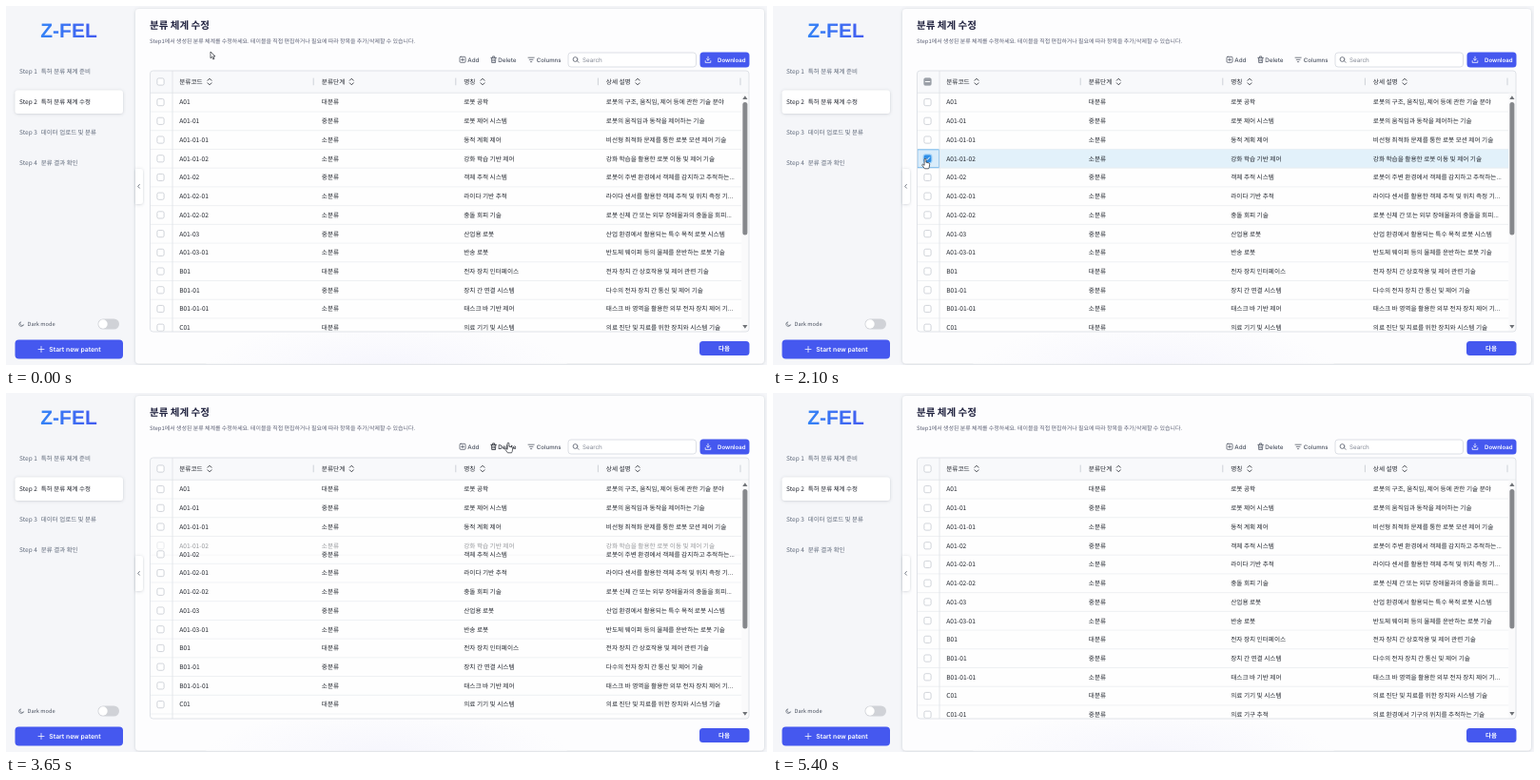
Write an HTML page that moves like this. It is 800 px wide and 377 px high and loops after 5450 ms.

```html
<!DOCTYPE html>
<html>
<head>
<meta charset="utf-8">
<title>분류 체계 수정</title>
<style>
  html, body { margin: 0; width: 100%; height: 100%; overflow: hidden; background: #f5f6f9; }
  svg { display: block; width: 800px; height: 377px; }
  text { font: 6.65px "Noto Sans CJK KR", "Noto Sans CJK", "Noto Sans", sans-serif; fill: #23272f; text-rendering: geometricPrecision; white-space: pre; }
  .ui { font: 500 6.25px Inter, sans-serif; fill: #4b5260; }
  .step { font-size: 6.5px; fill: #606a7b; }
  .head { font-weight: 500; }
  .line { fill: none; stroke: #4b5260; stroke-width: .75; stroke-linecap: round; stroke-linejoin: round; }
  .white { fill: #fff; }
  .line.white { fill: none; stroke: #fff; }
  .blue { fill: #4558ef; }
  .box { fill: #fff; stroke: #c6cad1; stroke-width: .8; }
  .hot text { fill: #171b24; }
  .hot .line { stroke: #171b24; }
</style>
</head>
<body>
<svg viewBox="0 0 800 377">
  <defs>
    <linearGradient id="brand"><stop stop-color="#3483f6"/><stop offset="1" stop-color="#435cf0"/></linearGradient>
    <filter id="soft" x="-20%" y="-20%" width="140%" height="140%"><feDropShadow dx="0" dy=".5" stdDeviation="1.5" flood-color="#606878" flood-opacity=".3"/></filter>
    <radialGradient id="tint"><stop stop-color="#f6f6fd"/><stop offset="1" stop-color="#fdfdfe"/></radialGradient>
    <clipPath id="body"><rect x="151" y="91.3" width="630" height="250.4"/></clipPath>
    <clipPath id="panel"><rect x="136" y="3" width="661" height="372.5" rx="4"/></clipPath>
    <clipPath id="frame"><rect x="151.5" y="68" width="629.5" height="274" rx="3"/></clipPath>
  </defs>

  <rect width="800" height="377" fill="#f5f6f9"/>
  <text x="66" y="33" text-anchor="middle" style="font:700 21px 'Liberation Sans',sans-serif;fill:url(#brand)">Z-FEL</text>
  <rect x="9.5" y="88.5" width="113.5" height="24.5" rx="3" fill="#fff" filter="url(#soft)"/>
  <g id="steps"></g>
  <path class="line" d="M18.3 335.1a2.4 2.4 0 1 1-2.7-3.3a2 2 0 0 0 2.7 3.3z" style="stroke-width:.6"/>
  <text x="22.5" y="336.1" style="font-size:5.7px;fill:#4b5260">Dark mode</text>
  <rect x="96.5" y="328.5" width="22.5" height="11" rx="5.5" fill="#d0d2d7"/>
  <circle cx="102" cy="334" r="4.7" fill="#fff"/>
  <rect class="blue" x="9.5" y="350.5" width="113.5" height="20" rx="4"/>
  <path class="line white" d="M34 360.5h6M37 357.5v6"/>
  <text class="ui white" x="45.3" y="362.9" style="font-size:6.8px;font-weight:600;fill:#fff">Start new patent</text>

  <rect x="136" y="3" width="661" height="372.5" rx="4" fill="#fdfdfe" filter="url(#soft)"/>
  <ellipse cx="400" cy="378" rx="190" ry="45" fill="url(#tint)" clip-path="url(#panel)"/>
  <path d="M136 171h5a3 3 0 0 1 3 3v31a3 3 0 0 1-3 3h-5z" fill="#fff" filter="url(#soft)"/>
  <path class="line" d="M140.4 187.4l-1.7 1.9l1.7 1.9"/>
  <text x="151" y="24" style="font-size:10.55px;font-weight:700;fill:#20223f">분류 체계 수정</text>
  <text x="151" y="38.6" style="font-size:5.95px;fill:#5c6075">Step1에서 생성된 분류 체계를 수정하세요. 테이블을 직접 편집하거나 필요에 따라 항목을 추가/삭제할 수 있습니다.</text>

  <rect class="line" x="477" y="53.3" width="6" height="6" rx="1"/>
  <path class="line" d="M478.6 56.3h2.8M480 54.9v2.8"/>
  <text class="ui" x="485.3" y="58.7">Add</text>
  <g id="del">
    <path class="line" d="M509.8 54.3h5.6M511.6 54.1v-1.2h2v1.2M510.4 54.5l.3 5h3.8l.3-5M511.9 56v2M513.3 56v2"/>
    <text class="ui" x="517.3" y="58.7">Delete</text>
  </g>
  <path class="line" d="M549 54.2h6.2M550.2 56.4h3.8M551.4 58.6h1.4"/>
  <text class="ui" x="557.8" y="58.7" style="font-size:6.1px">Columns</text>
  <rect x="591" y="49" width="134.5" height="15" rx="3" fill="#fff" stroke="#d9dce3" stroke-width=".9"/>
  <path class="line" d="M600.3 57.6l1.7 1.7M600.9 56a2.4 2.4 0 1 1-4.8 0a2.4 2.4 0 0 1 4.8 0"/>
  <text class="ui" x="606" y="58.8" style="font-weight:400;fill:#818793">Search</text>
  <rect class="blue" x="729.5" y="48.5" width="52" height="16" rx="3.5"/>
  <path class="line white" d="M738 53.2v3.8M736.4 55.6l1.6 1.6l1.6-1.6M735.2 57.6v1.8h5.6v-1.8"/>
  <text class="ui" x="748" y="58.8" style="font-size:6.1px;font-weight:600;fill:#fff">Download</text>

  <g clip-path="url(#frame)">
    <rect x="151" y="67" width="631" height="275" fill="#fefefe"/>
    <rect x="151" y="67" width="631" height="24" fill="#f8f9fb"/>
  </g>
  <g clip-path="url(#body)" id="rows"></g>
  <path d="M151.5 91.2h629.5M175 68v274" stroke="#dfe2e7" stroke-width=".8"/>
  <g id="heads"></g>
  <rect class="box" x="158.9" y="75.9" width="7.2" height="7.2" rx="1.6"/>
  <g id="partial">
    <rect x="158.5" y="75.5" width="8" height="8" rx="1.6" fill="#9a9fa7"/>
    <path class="line white" d="M160.3 79.5h4.4" style="stroke-width:1.1"/>
  </g>
  <rect x="773.3" y="91.6" width="7.4" height="250" fill="#fafafb"/>
  <path d="M774.3 98l2.6-3.8l2.6 3.8zM774.3 335l2.6 3.8l2.6-3.8z" fill="#6f7277"/>
  <rect id="thumb" x="774.4" y="101" width="5" rx="2.5" fill="#86888c"/>
  <rect x="151.5" y="68" width="629.5" height="274" rx="3" fill="none" stroke="#dcdfe5" stroke-width=".9"/>
  <rect class="blue" x="729" y="352" width="52.5" height="15" rx="3.5"/>
  <text x="755" y="361.9" text-anchor="middle" style="font-size:6.5px;font-weight:700;fill:#fff">다음</text>

  <g stroke="#20242c" stroke-width=".7" stroke-linejoin="round" fill="#fff">
    <path id="arrow" d="M0 0v6.8l1.6-1.5l1.2 2.7l1.2-.5l-1.2-2.6h2.2z"/>
    <path id="hand" d="M-.9 .8a.9 .9 0 0 1 1.8 0v3.1l3 .7q.9.3.8 1.2l-.5 3.3l-.7 1.4h-4.1l-2.5-3.4q-.4-1 .6-1.2l1.6 1.1z"/>
  </g>
</svg>
<script>
const LOOP = 5450, PITCH = 19.72, TOP = 91.3, PICK = 3;
const CHECK_AT = 1800, REMOVE_AT = 3560, SLIDE = 400, LAG = 150;
const cols = [182.2, 331.8, 481.2, 630.8];
const $ = id => document.getElementById(id);

const rows = `A01|대분류|로봇 공학|로봇의 구조, 움직임, 제어 등에 관한 기술 분야
A01-01|중분류|로봇 제어 시스템|로봇의 움직임과 동작을 제어하는 기술
A01-01-01|소분류|동적 계획 제어|비선형 최적화 문제를 통한 로봇 모션 제어 기술
A01-01-02|소분류|강화 학습 기반 제어|강화 학습을 활용한 로봇 이동 및 제어 기술
A01-02|중분류|객체 추적 시스템|로봇이 주변 환경에서 객체를 감지하고 추적하는...
A01-02-01|소분류|라이다 기반 추적|라이다 센서를 활용한 객체 추적 및 위치 측정 기...
A01-02-02|소분류|충돌 회피 기술|로봇 신체 간 또는 외부 장애물과의 충돌을 회피...
A01-03|중분류|산업용 로봇|산업 환경에서 활용되는 특수 목적 로봇 시스템
A01-03-01|소분류|반송 로봇|반도체 웨이퍼 등의 물체를 운반하는 로봇 기술
B01|대분류|전자 장치 인터페이스|전자 장치 간 상호작용 및 제어 관련 기술
B01-01|중분류|장치 간 연결 시스템|다수의 전자 장치 간 통신 및 제어 기술
B01-01-01|소분류|태스크 바 기반 제어|태스크 바 영역을 활용한 외부 전자 장치 제어 기...
C01|대분류|의료 기기 및 시스템|의료 진단 및 치료를 위한 장치와 시스템 기술
C01-01|중분류|의료 기구 추적|의료 환경에서 기구의 위치를 추적하는 기술`.split('\n').map(r => r.split('|'));

$('steps').innerHTML = ['특허 분류 체계 준비', '특허 분류 체계 수정', '데이터 업로드 및 분류', '분류 결과 확인'].map((name, i) => {
  const y = 71 + i * 32, ink = i === 1 ? ' style="fill:#20242e"' : '';
  return `<text class="step" x="14" y="${y}"${ink}>Step ${i + 1}</text><text class="step" x="36.8" y="${y}"${ink}>${name}</text>`;
}).join('');

$('heads').innerHTML = [['분류코드', 214], ['분류단계', 363.3], ['명칭', 501], ['상세 설명', 664]].map(([name, x], i) =>
  `<text class="head" x="${cols[i]}" y="82">${name}</text>
   <path class="line" d="M${x - 2} 78.2l2-2l2 2M${x - 2} 80.8l2 2l2-2" style="stroke-width:.9;stroke:#30343c"/>
   <path d="M${323.2 + i * 149.6} 75.6v7.6" stroke="#c9cdd4" stroke-width=".9"/>`).join('');

$('rows').innerHTML = rows.map((cells, i) =>
  `<g><rect x="151" width="622.5" height="${PITCH}" fill="none"/>
   <path d="M151 ${PITCH}h622.5" stroke="#e9ebef" stroke-width=".7"/>
   <rect class="box" x="158.9" y="6.2" width="7.2" height="7.2" rx="1.6"/>
   ${i === PICK ? `<g id="tick"><rect x="151.9" y=".4" width="22.7" height="18.9" fill="#d9ecfa" stroke="#62aeea" stroke-width=".8"/>
     <rect x="157.6" y="4.9" width="9.8" height="9.8" rx="2.6" fill="#9fd0f7"/>
     <rect x="158.7" y="6" width="7.6" height="7.6" rx="1.6" fill="#2e8fe8"/>
     <path class="line white" d="M160.6 9.9l1.4 1.4l2.6-2.9" style="stroke-width:1"/></g>` : ''}
   ${cells.map((c, k) => `<text x="${cols[k]}" y="12.2">${c}</text>`).join('')}</g>`).join('');
const rowEls = [...$('rows').children];

// time, x, y of the pointer's hot spot
const path = [[0, 215, 48], [250, 215, 48], [750, 157, 161], [950, 157, 161], [1150, 160, 160.3],
  [2100, 160, 160.3], [2550, 540, 88.8], [2800, 528, 52.3], [4450, 528, 52.3], [4800, 508, -14], [LOOP, 508, -14]];

function pointer(t) {
  const i = Math.max(1, path.findIndex(p => p[0] > t));
  const [t0, x0, y0] = path[i - 1], [t1, x1, y1] = path[i];
  const e = (1 - Math.cos(Math.PI * (t - t0) / (t1 - t0))) / 2;
  return [x0 + (x1 - x0) * e, y0 + (y1 - y0) * e];
}

const within = (t, a, b) => t >= a && t < b;
const show = (el, on) => el.setAttribute('visibility', on ? 'visible' : 'hidden');

function draw(t) {
  const [x, y] = pointer(t);
  const hovered = Math.floor((pointer(Math.max(0, t - LAG))[1] - TOP) / PITCH);
  const picked = within(t, CHECK_AT, REMOVE_AT);
  const p = Math.min(1, Math.max(0, (t - REMOVE_AT) / SLIDE));
  const slide = 1 - (1 - p) ** 3;

  rowEls.forEach((el, i) => {
    const top = TOP + PITCH * (i - (i > PICK ? slide : 0));
    const fill = picked && i === PICK ? '#e2f1fa' : i === hovered ? '#ebf5fc' : 'none';
    el.setAttribute('transform', `translate(0 ${top})`);
    el.firstChild.setAttribute('fill', fill);
  });
  rowEls[PICK].setAttribute('opacity', 1 - slide);
  rowEls[PICK].setAttribute('display', p < 1 ? 'inline' : 'none');
  show($('tick'), picked);
  show($('partial'), picked);
  $('thumb').setAttribute('height', t < REMOVE_AT ? 139.5 : 146.5);
  $('del').setAttribute('class', within(t, 2750, 4560) ? 'hot' : '');

  const hand = within(t, 1050, 2150) || within(t, 2750, 4560);
  for (const [id, on] of [['arrow', !hand], ['hand', hand]]) {
    $(id).setAttribute('transform', `translate(${x} ${y})`);
    show($(id), on);
  }
}

const start = performance.now();
function tick() {
  draw((performance.now() - start) % LOOP);
  requestAnimationFrame(tick);
}
tick();
</script>
</body>
</html>
```
